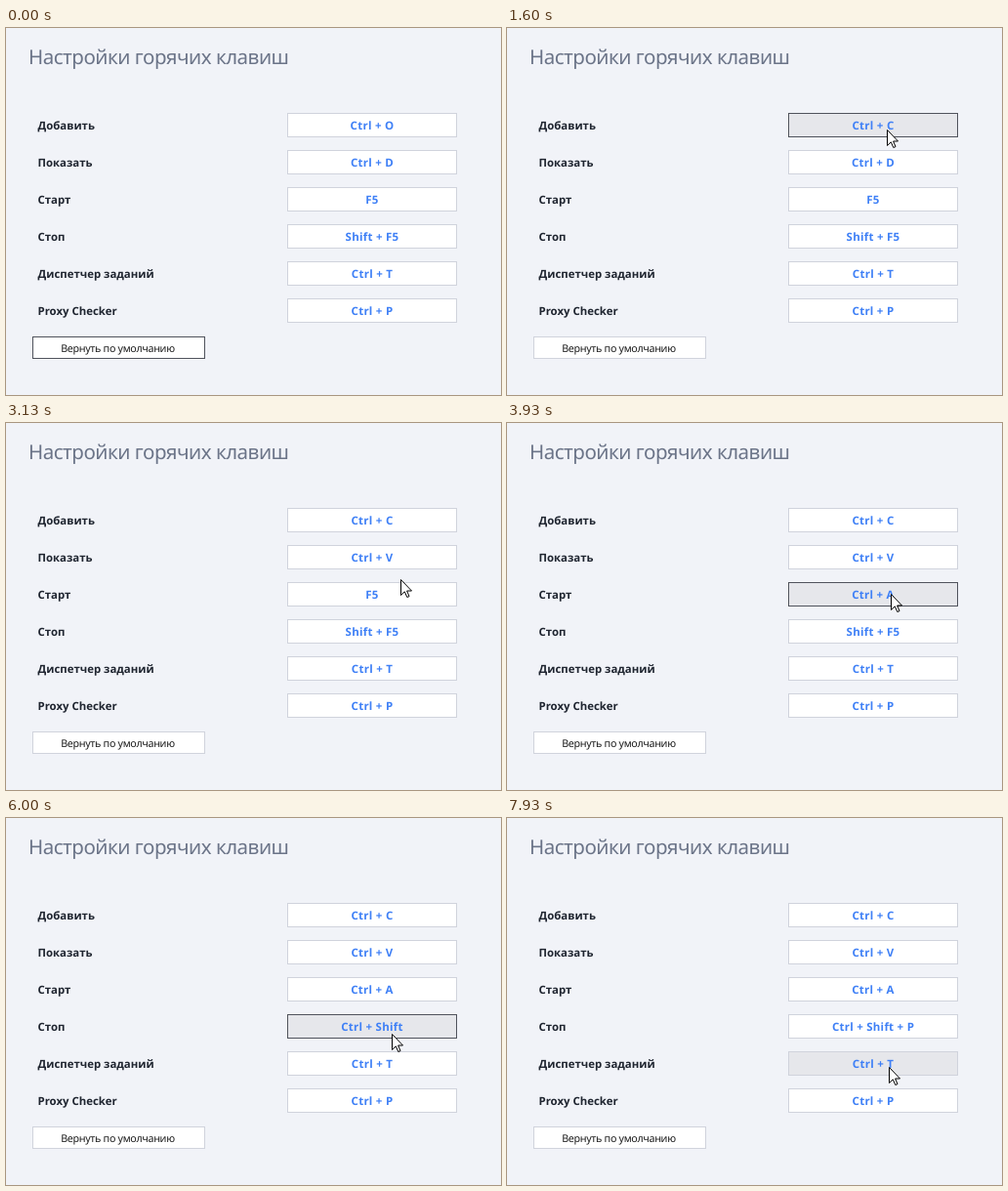
Recreate the animation shown at these times as an HTML page. Size 507x376 px, loop 8 s.

```html
<!DOCTYPE html>
<html lang="ru">
<head>
<meta charset="utf-8">
<title>Горячие клавиши</title>
<style>
html, body { margin: 0; width: 100%; height: 100%; overflow: hidden; background: #f1f3f8; }
svg { display: block; width: 100vw; height: 100vh; }
text { font-family: "Noto Sans", "Open Sans", sans-serif; text-rendering: geometricPrecision; }
rect { fill: #fff; stroke: #d0d3dc; }
.title { font-size: 20.5px; letter-spacing: -.5px; fill: #6b7488; }
.label { font-size: 11.4px; font-weight: 700; fill: #1f2530; }
.key { font-size: 11.5px; font-weight: 700; letter-spacing: .25px; fill: #3f80f6; text-anchor: middle; }
.reset { font-size: 10.7px; letter-spacing: -.33px; fill: #1c1c1c; text-anchor: middle; }
rect.hover { fill: #e6e7eb; }
rect.focus { stroke: #50535c; }
#cursor { fill: #fff; stroke: #000; }
</style>
</head>
<body>
<svg id="stage" viewBox="0 0 507 376">
  <text class="title" x="23" y="37">Настройки горячих клавиш</text>
  <g id="rows"></g>
  <rect id="reset" x="27.5" y="316.5" width="176" height="22"/>
  <text class="reset" x="114.5" y="332">Вернуть по умолчанию</text>
  <path id="cursor" d="M.5 .5V16.5L4.3 12.8L6.8 18.5L9 17.6L6.6 12H11.5Z"/>
</svg>
<script>
const LOOP = 8000, FRAME = 1000 / 15;
const LEFT = 288, TOP = 87, WIDTH = 174, HEIGHT = 25, STEP = 38;

// focus: [from, to]; keys: [time, text]
const rows = [
  { label: 'Добавить', focus: [1130, 1730], keys: [[0, 'Ctrl + O'], [1470, 'Ctrl'], [1600, 'Ctrl + C']] },
  { label: 'Показать', focus: [2330, 2730], keys: [[0, 'Ctrl + D'], [2470, 'Ctrl'], [2600, 'Ctrl + V']] },
  { label: 'Старт', focus: [3470, 4000], keys: [[0, 'F5'], [3730, 'Ctrl'], [3870, 'Ctrl + A']] },
  { label: 'Стоп', focus: [4730, 6530], keys: [[0, 'Shift + F5'], [5600, 'Ctrl'], [6000, 'Ctrl + Shift'], [6400, 'Ctrl + Shift + P']] },
  { label: 'Диспетчер заданий', keys: [[0, 'Ctrl + T']] },
  { label: 'Proxy Checker', keys: [[0, 'Ctrl + P']] }
];

const linear = p => p, easeOut = p => p * (2 - p), smooth = p => p * p * (3 - 2 * p);

// time, x, y, easing towards this point
const path = [
  [330, 484, 207], [800, 389, 100, easeOut],
  [1430, 389, 100], [2270, 388, 137, smooth],
  [2530, 388, 137], [3130, 404, 160, smooth], [3270, 395, 172], [3330, 393, 174], [3470, 393, 175],
  [3900, 393, 175], [4530, 395, 204, smooth], [4670, 396, 218], [4800, 396, 221, easeOut],
  [5200, 396, 221], [5270, 395, 221],
  [7200, 395, 221], [7270, 391, 223], [7600, 392, 300, smooth], [7930, 391, 255, smooth],
  [LOOP, 391, 255]
];

const byId = id => document.getElementById(id);
const cursor = byId('cursor'), reset = byId('reset');

function add(tag, attrs, text = '') {
  const el = document.createElementNS('http://www.w3.org/2000/svg', tag);
  for (const name in attrs) el.setAttribute(name, attrs[name]);
  el.textContent = text;
  return byId('rows').appendChild(el);
}

rows.forEach((row, i) => {
  row.y = TOP + i * STEP;
  add('text', { class: 'label', x: 32.5, y: row.y + 17 }, row.label);
  row.box = add('rect', { x: LEFT + .5, y: row.y + .5, width: WIDTH - 1, height: HEIGHT - 1 });
  row.text = add('text', { class: 'key', x: LEFT + WIDTH / 2, y: row.y + 17 });
});

function cursorAt(t) {
  const i = Math.max(1, path.findIndex(p => p[0] >= t));
  const [t0, x0, y0] = path[i - 1], [t1, x1, y1, ease = linear] = path[i];
  const k = ease((t - t0) / (t1 - t0));
  return [Math.round(x0 + (x1 - x0) * k), Math.round(y0 + (y1 - y0) * k)];
}

function draw(t) {
  const shown = t >= 330, [x, y] = cursorAt(Math.max(t, 330));
  cursor.style.display = shown ? '' : 'none';
  cursor.setAttribute('transform', `translate(${x} ${y})`);
  reset.classList.toggle('focus', t < 1130);
  for (const { y: top, box, text, focus = [0, 0], keys } of rows) {
    const inside = x >= LEFT && x < LEFT + WIDTH && y >= top && y < top + HEIGHT;
    box.classList.toggle('hover', shown && inside);
    box.classList.toggle('focus', t >= focus[0] && t < focus[1]);
    text.textContent = keys.filter(k => k[0] <= t).pop()[1];
  }
}

// Time advances in 15 steps per second, rounded to 10 ms
function tick(now) {
  const t = now % LOOP;
  draw(Math.round(Math.floor((t + 4) / FRAME) * FRAME / 10) * 10 % LOOP);
  requestAnimationFrame(tick);
}
draw(0);
requestAnimationFrame(tick);
</script>
</body>
</html>
```
